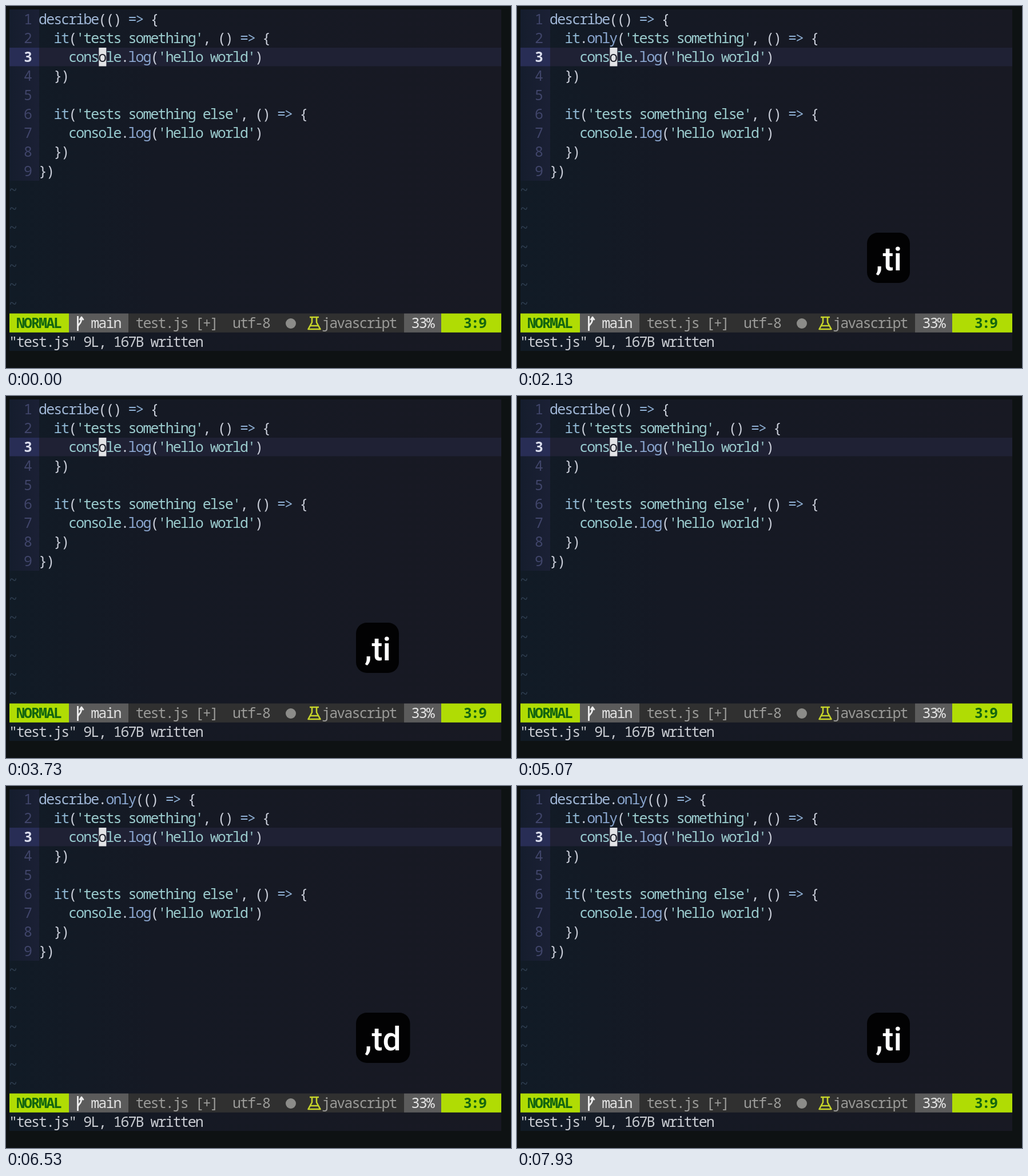
Animation of 883 by 634 pixels, one loop 8 s. Source, as an HTML page:

```html
<!DOCTYPE html>
<html lang="en">
<head>
<meta charset="utf-8">
<title>Editor toggle</title>
<style>
  html, body { margin: 0; width: 100%; height: 100%; overflow: hidden; background: #0e1213; }
  svg { display: block; width: 883px; height: 634px; }
  text { white-space: pre; }
  .code {
    font: 500 25px "Noto Sans Mono", "DejaVu Sans Mono", monospace;
    font-stretch: semi-condensed;
    text-anchor: middle;
  }
  .bold { font-weight: 700; }
  .keys { font: 500 57px Roboto, "Liberation Sans", sans-serif; fill: #fff; }
</style>
</head>
<body>
<svg id="stage" viewBox="0 0 883 634">
  <defs>
    <linearGradient id="edge">
      <stop offset="0" stop-color="#111b26"/>
      <stop offset="0.3" stop-color="#151924"/>
      <stop offset="1" stop-color="#181923"/>
    </linearGradient>
    <linearGradient id="gutter">
      <stop offset="0" stop-color="#151d2d"/>
      <stop offset="1" stop-color="#1b2035"/>
    </linearGradient>
  </defs>
</svg>
<script>
const LOOP = 8000;
const CELL = 13.03, ROW = 33.25, LEFT = 6, TOP = 6.5;
const stage = document.getElementById('stage');

const colors = {
  describe: '#a0b7d6', it: '#8fb6d2', console: '#98cbd0', log: '#8ba7d0', only: '#8ba7d0',
  arrow: '#8fb0d4', string: '#9bcbcd', plain: '#c9cdd8',
  lime: '#b0dc04', limeText: '#14660f', number: '#40456a'
};

function add(tag, attrs, parent = stage) {
  const node = document.createElementNS('http://www.w3.org/2000/svg', tag);
  for (const key in attrs) node.setAttribute(key, attrs[key]);
  return parent.appendChild(node);
}

const colX = col => LEFT + col * CELL;
const rowY = row => TOP + row * ROW;
const rect = (x, y, width, height, fill) => add('rect', { x, y, width, height, fill });

// Centres every character in its terminal cell.
function put(col, row, text, fill, bold = false, parent = stage) {
  const x = [...text].map((_, i) => colX(col + i + 0.5).toFixed(2)).join(' ');
  add('text', { x, y: rowY(row) + 25, fill, class: bold ? 'code bold' : 'code' }, parent)
    .textContent = text;
}

function tokenColor(token) {
  if (token === '=>') return colors.arrow;
  if (token[0] === "'") return colors.string;
  return colors[token] || colors.plain;
}

function codeLine(row, source) {
  const group = add('g', {});
  for (const match of source.matchAll(/'[^']*'|\w+|=>|[^\w'\s=]+/g))
    put(4 + match.index, row, match[0], tokenColor(match[0]), false, group);
  return group;
}

// Editor background, gutter and cursor line
rect(6, 6, 860, 598, 'url(#edge)');
rect(6, 6, 52, 300, 'url(#gutter)');
rect(58, rowY(2), 808, 32.5, '#1f2134');
rect(6, rowY(2), 52, 32.5, '#282d55');

for (let row = 0; row < 9; row++)
  put(2, row, String(row + 1), row === 2 ? '#dde0f0' : colors.number, row === 2);
for (let row = 9; row < 16; row++) put(0, row, '~', '#2f3e50');

// Code
const suite = ['describe(() => {', 'describe.only(() => {'].map(s => codeLine(0, s));
const test = ["  it('tests something', () => {", "  it.only('tests something', () => {"]
  .map(s => codeLine(1, s));
[
  "    console.log('hello world')", '  })', '',
  "  it('tests something else', () => {",
  "    console.log('hello world')", '  })', '})'
].forEach((source, i) => codeLine(i + 2, source));

rect(colX(12), rowY(2), CELL, 32.5, '#e2e3e6');
put(12, 2, 'o', '#20222c');

// Status line
const statusY = rowY(16);
[
  [6, 110, colors.lime], [110, 214, '#5b5b5b'], [214, 696, '#303030'],
  [696, 761, '#5b5b5b'], [761, 866, colors.lime]
].forEach(([from, to, fill]) => rect(from, statusY, to - from, ROW, fill));
put(1, 16, 'NORMAL', colors.limeText, true);
put(11, 16, 'main', '#e2e2e2');
put(17, 16, 'test.js [+]', '#9a9a98');
put(30, 16, 'utf-8', '#9a9a98');
put(42, 16, 'javascript', '#9a9a98');
put(54, 16, '33%', '#e6e6e6');
put(61, 16, '3:9', colors.limeText, true);
put(0, 17, '"test.js" 9L, 167B written', '#c9ccd2');

// Status icons
const line = (d, stroke, width) => add('path', { d, stroke, 'stroke-width': width, fill: 'none', 'stroke-linejoin': 'round' });
line('M125.5 543V569M125.5 562C126 556 132 558 132 547M128.5 550L132 545L135.5 550', '#eeeeee', 2.8);
add('circle', { cx: 498, cy: 556, r: 9, fill: '#8c8c89' });
line('M531 545H547M535 546V554L528.5 566H549.5L543 554V546M532 560H546', '#c6d42a', 2.6);

// Keystroke overlay
const overlay = add('g', {});
const bezel = add('rect', { x: 612, y: 397, height: 88, rx: 19, fill: '#020203' }, overlay);
const keys = add('text', { x: 627, y: 463, class: 'keys' }, overlay);
const bezelWidth = { '': 0, ',': 47.5, ',t': 63, ',ti': 75, ',td': 94.5 };

// [time, keys, describe.only, it.only]
const steps = [
  [0, '', 0, 0],
  [330, ',', 0, 0], [460, ',t', 0, 0], [600, ',ti', 0, 1],
  [2670, ',', 0, 1], [2800, ',t', 0, 1], [2930, ',ti', 0, 0],
  [5070, '', 0, 0],
  [5430, ',', 0, 0], [5560, ',t', 0, 0], [5700, ',td', 1, 0],
  [7330, ',', 1, 0], [7430, ',t', 1, 0], [7530, ',ti', 1, 1]
];
const FADE = [4900, 5070];

const choose = (variants, index) =>
  variants.forEach((node, i) => node.setAttribute('visibility', i === index ? 'visible' : 'hidden'));

function render() {
  const t = performance.now() % LOOP;
  const [, typed, suiteOnly, testOnly] = steps.findLast(step => step[0] <= t);
  choose(suite, suiteOnly);
  choose(test, testOnly);
  keys.textContent = typed;
  bezel.setAttribute('width', bezelWidth[typed]);
  const fading = t >= FADE[0] && t < FADE[1];
  overlay.setAttribute('opacity', fading ? (FADE[1] - t) / (FADE[1] - FADE[0]) : 1);
  requestAnimationFrame(render);
}
render();
</script>
</body>
</html>
```
